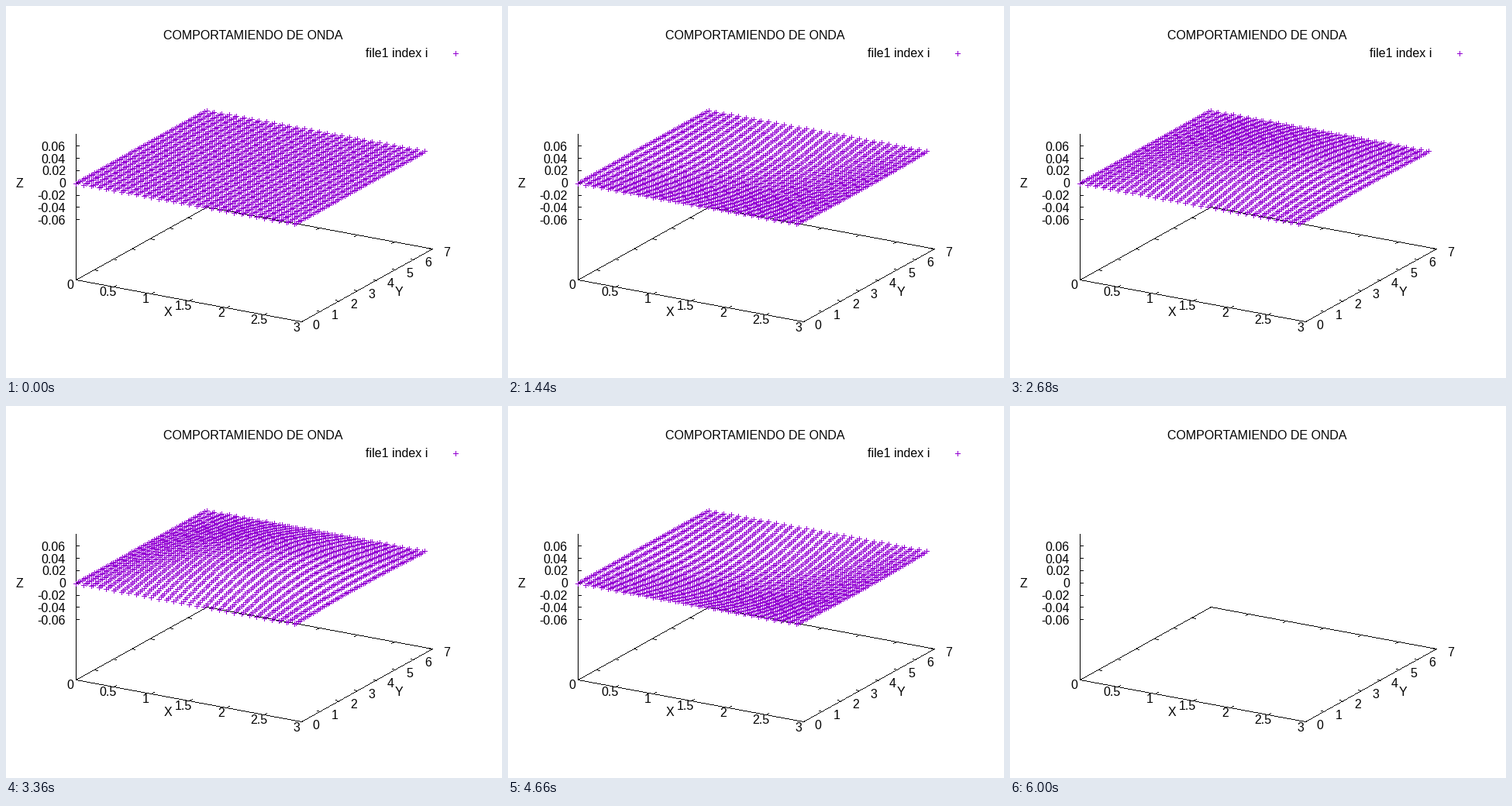
Write a matplotlib script that moves like this. It is 640 px wide and 480 px high and loops after 6.02 s.

```python
import numpy as np
import matplotlib.pyplot as plt
from matplotlib.animation import FuncAnimation
from matplotlib.markers import MarkerStyle

W, H, DPI = 640, 480, 100
FRAMES, STEP_MS = 301, 20
PX = 72 / DPI                       # one pixel in points
VIOLET = "#9400d3"
LX, LY = 3, 7
AMP = 0.04
OMEGA = np.sqrt(5) * np.pi * np.hypot(1 / LX, 1 / LY) * 0.02
Z_PX = 792                          # pixels per unit of height
Z_MID, FLOOR = 228.7, 354.2         # screen rows of z = 0 and of the base

plt.rcParams["font.family"] = "Liberation Sans"
fig = plt.figure(figsize=(W / DPI, H / DPI), dpi=DPI, facecolor="white")
ax = fig.add_axes([0, 0, 1, 1])
ax.set(xlim=(0, W), ylim=(H, 0))
ax.axis("off")


def project(x, y, row=FLOOR):
    u, v = x / LX, y / LY
    return 90.4 + 291 * u + 168.2 * v, row + 54.1 * u - 93.8 * v


def segment(p, q):
    """Stepped one-pixel line."""
    p, q = np.round([p, q])
    n = int(np.abs(q - p).max()) + 1
    x, y = np.round(np.linspace(p, q, n)).T
    ax.plot(x, y, ls="none", marker=",", color="black", aa=False, zorder=1)


def label(x, y, text, ha="center"):
    return ax.text(x, y, text, size=16 * PX, ha=ha, va="baseline", zorder=2)


def crosses(x, y):
    mark = MarkerStyle("+", capstyle="projecting")
    return ax.plot(x, y, ls="none", marker=mark, ms=6 * PX, mew=PX,
                   color=VIOLET, aa=False, zorder=3)[0]


# base and vertical axis
corners = [(0, 0), (LX, 0), (LX, LY), (0, LY), (0, 0)]
for a, b in zip(corners, corners[1:]):
    segment(project(*a), project(*b))
segment((90, 166), (90, 354))

# ticks and their numbers
for k in range(7):
    for y, s in ((0, 1), (LY, -1)):
        px, py = project(k / 2, y)
        segment((px, py), (px + 3.6 * s, py - 2 * s))
    label(82.5 + 48.75 * k, 365 + 9.1 * k, f"{k / 2:g}")
for k in range(8):
    for x, s in ((0, 1), (LX, -1)):
        px, py = project(x, k)
        segment((px, py), (px + 4 * s, py + s))
    label(400 + 24.1 * k, 417 - 13.45 * k, f"{k}")
for k in range(-3, 4):
    row = Z_MID - k * 0.02 * Z_PX
    segment((90, row), (94, row))
    label(77, row + 5.5, f"{k * 0.02:.2f}" if k else "0", "right")

label(319, 43, "COMPORTAMIENDO DE ONDA")
label(209, 400, "X")
label(507, 374, "Y")
label(17.5, 234, "Z")

key = label(544, 66, "file1 index i", "right")
key_mark = crosses([580], [61])

# membrane, sampled every 0.1
gx, gy = np.meshgrid(np.arange(30) / 10, np.arange(71) / 10, indexing="ij")
sx, sy = project(gx, gy, Z_MID)
mode = AMP * Z_PX * np.sin(np.pi * gx / LX) * np.sin(np.pi * gy / LY)
cloud = crosses([], [])


def update(i):
    shown = i < FRAMES - 1
    z = mode * np.sin(OMEGA * i)
    cloud.set_data(np.round(sx).ravel(), np.round(sy - z).ravel())
    for part in (cloud, key, key_mark):
        part.set_visible(shown)
    return cloud, key, key_mark


anim = FuncAnimation(fig, update, frames=FRAMES, interval=STEP_MS,
                     repeat=True, repeat_delay=0, blit=False)
plt.show()
```
